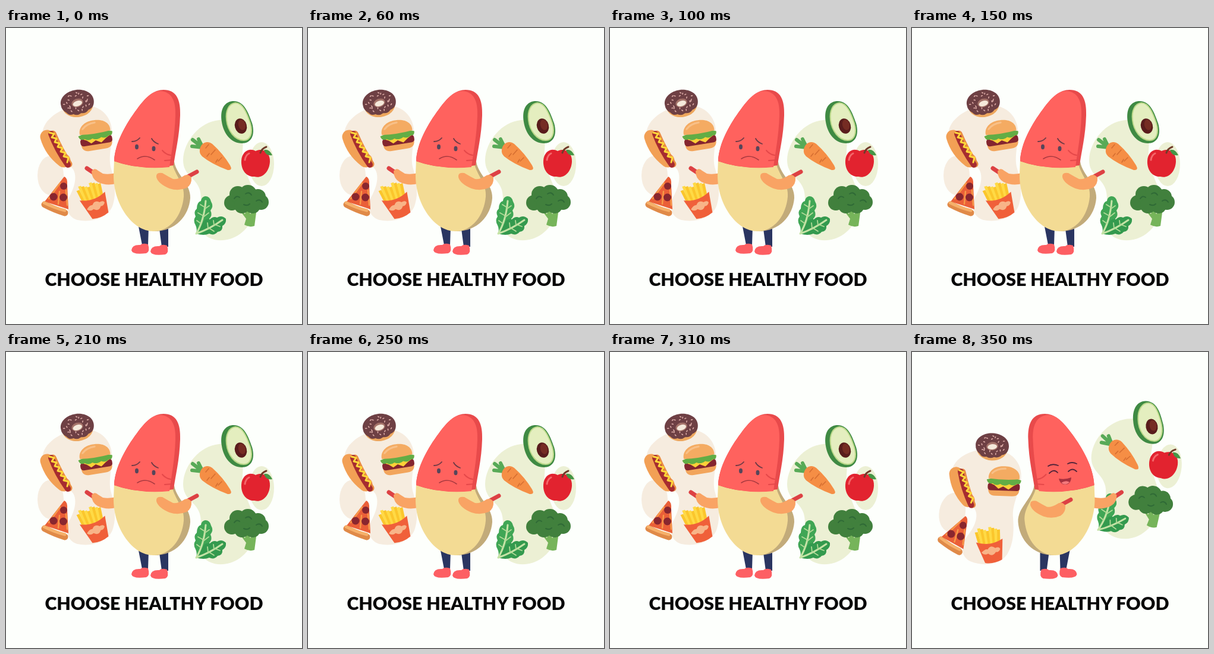
These frames come from a looping animation (498x498 px, 400 ms). An HTML page:

```html
<!DOCTYPE html>
<html lang="en">
<head>
<meta charset="utf-8">
<title>Choose healthy food</title>
<style>
  html, body { margin: 0; width: 100%; height: 100%; overflow: hidden; background: #fdfffc; }
  svg { display: block; width: 100%; height: 100%; }
  text { font: 900 30.3px Lato, sans-serif; text-anchor: middle; fill: #080808; }
  .line { fill: none; stroke-linecap: round; stroke-linejoin: round; }
</style>
</head>
<body>
<svg viewBox="0 0 498 498">
  <g id="junk">
    <g fill="#f6ecdf">
      <path d="M61 182C60 156 86 139 112 132C150 122 181 144 178 180C177 206 172 218 177 237C182 256 187 278 179 300C170 320 143 328 120 323C101 317 99 297 109 279C119 260 120 238 106 232C82 226 62 210 61 182Z"/>
      <ellipse cx="75" cy="248" rx="22" ry="33"/>
    </g>

    <g transform="translate(120 126) rotate(-8)">
      <ellipse cy="4" rx="26" ry="20" fill="#eda75e"/>
      <path d="M-28 -1C-28 -14-14-22 0-22S28-14 28-1C28 7 24 13 17 14Q12 20 4 18Q-3 22-9 18Q-16 20-20 14Q-28 9-28-1Z" fill="#6e4044"/>
      <ellipse rx="10" ry="7" transform="rotate(-10)" fill="#a5736a"/>
      <ellipse cy="1" rx="8" ry="4.5" transform="rotate(-10)" fill="#f5e9db"/>
      <g id="sprinkles" class="line" stroke="#e5b4ae" stroke-width="1.5"/>
    </g>

    <g transform="translate(150.5 180) rotate(-9)">
      <path d="M-26 9H26Q28 25 14 25H-14Q-28 25-26 9Z" fill="#f2a55c"/>
      <rect x="-27" y="3" width="54" height="13" rx="5" fill="#84252f"/>
      <path d="M-25 3H25L16 8L8 14L-1 9L-9 13L-16 7Z" fill="#fcd038"/>
      <path d="M-29 -2Q-15-7 0-5Q18-7 29-2Q28 6 22 4Q16 9 9 5Q1 10-6 5Q-13 9-19 4Q-27 7-29-2Z" fill="#62ad45"/>
      <path d="M-26-4C-27-19-12-26 1-25C16-25 28-17 26-4Q0-1-26-4Z" fill="#f4ab62"/>
      <path class="line" d="M-20-13Q-12-21 2-21" stroke="#f8c088" stroke-width="3"/>
    </g>

    <g class="line">
      <path d="M69 183Q76 207 97 223" stroke="#f2a055" stroke-width="23"/>
      <path d="M79 178Q90 204 106 229" stroke="#e98b42" stroke-width="11"/>
      <path d="M76 178Q86 205 104 230" stroke="#a62c30" stroke-width="10"/>
      <path d="M73 176l8 2-4 6 8 2-3 6 8 2-3 6 8 2-3 6 8 2-3 6 8 2-2 8" stroke="#ffd83a" stroke-width="3"/>
    </g>

    <path d="M98 250Q104 252 103 265L105 305L65 292Z" fill="#ea5f38"/>
    <path class="line" d="M65 297Q82 306 99 311" stroke="#e08a48" stroke-width="11"/>
    <path class="line" d="M64 294Q82 303 99 307" stroke="#f6b06a" stroke-width="5"/>
    <path class="line" d="M91 261L72 287M101 273L103 298M88 296L90 275" stroke="#f79a48" stroke-width="2.5"/>
    <g fill="#89262f">
      <circle cx="97" cy="266" r="6"/><circle cx="80" cy="284" r="6.5"/><circle cx="96.5" cy="285" r="6.5"/>
    </g>

    <g transform="translate(147 287) rotate(-18)">
      <g id="fries"/>
      <path d="M-23-4Q0 6 22-5L17 30Q2 36-12 32Z" fill="#f0603a"/>
      <path d="M-16 14Q-9 8-5 10Q1 2 8 9Q15 7 16 12Q13 17 8 16Q2 24-5 17Q-12 20-16 14Z" fill="#f8b488"/>
    </g>
  </g>

  <g id="greens">
    <g fill="#ecf0d4">
      <path d="M298 222C299 190 326 158 358 155C388 152 402 178 398 206C396 230 404 242 412 263C426 295 418 330 393 347C370 363 340 360 328 340C318 322 333 297 326 272C319 250 298 249 298 222Z"/>
      <ellipse cx="430" cy="229" rx="21" ry="37"/>
    </g>

    <path d="M381 123C400 122 407 140 414 160C420 181 412 194 397 194C379 194 366 178 363 158C360 140 365 125 381 123Z" fill="#3f8a43"/>
    <path d="M386 126C398 126 405 142 411 160C416 177 411 189 400 189C385 189 373 173 371 155C369 139 375 127 386 126Z" fill="#e4eebf" stroke="#bcd98a" stroke-width="2"/>
    <ellipse cx="395" cy="165" rx="10" ry="13" transform="rotate(-15 395 165)" fill="#591c1c"/>
    <ellipse cx="397" cy="163" rx="6" ry="9" transform="rotate(-15 397 163)" fill="#752c23"/>

    <path class="line" d="M331 201L313 199M331 201L314 188M331 201L324 187" stroke="#58aa57" stroke-width="6"/>
    <path d="M326 205C327 194 338 188 347 195Q365 211 377 231Q382 240 373 239Q346 229 330 216Q325 211 326 205Z" fill="#f58e45"/>
    <path class="line" d="M341 196L336 202M352 205L345 213M338 216L342 211M363 218L357 224M353 226L356 221" stroke="#d66e31" stroke-width="1.6"/>

    <path d="M420 207C432 201 445 209 444 225C443 243 430 254 418 250C404 251 395 238 396 223C397 208 409 201 420 207Z" fill="#e2232f"/>
    <path class="line" d="M402 222Q403 214 409 211" stroke="#f4676a" stroke-width="3"/>
    <path class="line" d="M428 210Q430 203 438 200" stroke="#713b29" stroke-width="3"/>
    <path d="M434 205Q443 203 448 214Q437 216 434 205Z" fill="#469646"/>

    <path d="M389 301L402 313L405 302L411 313L422 303L418 333Q410 336 401 331L404 321Z" fill="#76b45a"/>
    <g fill="#41803d">
      <circle cx="380" cy="294" r="13"/><circle cx="390" cy="280" r="14"/><circle cx="407" cy="279" r="15"/>
      <circle cx="424" cy="284" r="13"/><circle cx="429" cy="293" r="13"/><circle cx="415" cy="299" r="13"/><circle cx="397" cy="299" r="13"/>
    </g>
    <path class="line" d="M384 287Q388 281 393 285M403 279Q409 275 413 281M421 291Q427 287 431 293M400 297Q406 300 410 296" stroke="#2f6a36" stroke-width="2"/>

    <path d="M335 283Q343 283 345 292Q350 300 344 307Q348 315 342 321Q342 331 332 336L320 347Q322 338 319 332Q314 324 319 317Q315 309 321 304Q321 293 328 291Q329 284 335 283Z" fill="#40a655"/>
    <path d="M320 346Q327 337 331 328Q335 320 343 322Q349 316 355 319Q363 314 370 321Q371 329 364 333Q365 342 356 343Q350 350 342 346Q333 350 320 346Z" fill="#349a4e"/>
    <path class="line" d="M320 346Q333 325 336 291M320 346Q343 338 364 323" stroke="#c5e3a6" stroke-width="3"/>
    <path class="line" d="M335 302L327 297M335 304L342 299M332 316L323 311M332 318L341 311M328 329L321 324M340 337L339 328M350 332L349 324M342 337L350 342M352 331L360 334" stroke="#b3da98" stroke-width="1.8"/>
  </g>

  <g id="body">
    <path d="M223 334H240L239 365H229ZM258 338H273V368H262Z" fill="#2a3561"/>
    <path d="M211 374Q212 364 226 365Q230 361 239 364Q243 376 236 379Q213 382 211 374ZM243 376Q244 366 258 367Q262 363 271 366Q275 378 268 381Q245 384 243 376Z" fill="#fd5f63"/>
    <path class="line" d="M136 236L148 244" stroke="#dd4144" stroke-width="7"/>
    <path d="M144 241Q149 234 155 240L163 245Q172 247 185 244V262Q168 266 154 259Q144 253 144 241Z" fill="#f9a364"/>
    <path d="M240 225H283C287 248 311 262 310 286C308 316 285 342 250 342Z" fill="#c2ab7a"/>
    <path d="M182 221L279 226C285 250 301 262 299 284C296 316 276 342 248 342C213 342 181 297 181 248Z" fill="#f3db94"/>
    <path d="M182 224C183 194 202 161 220 137C236 115 249 104 265 104C287 104 294 121 293 147C292 182 285 208 282 231Q225 240 182 224Z" fill="#e84a4b"/>
    <path d="M182 224C183 194 202 161 220 137C236 115 247 106 259 106C279 107 286 123 285 147C284 182 278 209 275 234Q225 239 182 224Z" fill="#ff625e"/>
    <path class="line" d="M263 206Q269 213 277 214M267 223L281 222" stroke="#e5484a" stroke-width="2"/>
  </g>

  <g id="arm">
    <path class="line" d="M306 250L321 242" stroke="#dd4144" stroke-width="7"/>
    <path d="M253 251Q252 242 263 244Q273 250 281 254Q289 255 297 250Q306 243 312 252Q313 263 304 269Q290 275 275 270Q256 262 253 251Z" fill="#f9a364"/>
  </g>

  <g id="sad">
    <path class="line" d="M212 191Q220 191 225 185M245 186Q248 192 256 195" stroke="#6b3a46" stroke-width="1.8"/>
    <path class="line" d="M221 220Q235 211 250 222" stroke="#a83a40" stroke-width="1.6"/>
    <g fill="#57465a">
      <ellipse cx="220" cy="200" rx="3" ry="4.2"/><ellipse cx="248.5" cy="203" rx="3" ry="4.2"/>
    </g>
  </g>
  <g id="happy" class="line" stroke="#52253a" stroke-width="1.8">
    <path d="M229 192Q236 187 246 191M262 188Q269 184 277 188M231 204Q239 196 245 203M263 201Q270 194 277 201"/>
    <path d="M247 213Q258 215 268 211Q267 223 258 223Q249 223 247 213Z" fill="#a6303f" stroke="none"/>
    <path d="M251 220Q259 215 265 219Q258 226 251 220Z" fill="#f5797c" stroke="none"/>
  </g>

  <text x="249" y="433.7">CHOOSE HEALTHY FOOD</text>
</svg>
<script>
const el = id => document.getElementById(id);

let specks = '';
for (let i = 0; i < 24; i++) {
  const a = i * 2.4, r = 0.6 + 0.13 * (i % 3);
  const x = 25 * r * Math.cos(a), y = 18 * r * Math.sin(a) - 1;
  specks += `M${x} ${y}l${2 * Math.cos(i * 5)} ${2 * Math.sin(i * 5)}`;
}
el('sprinkles').innerHTML = `<path d="${specks}"/>`;

for (let i = 0; i < 9; i++) {
  const x = -23 + i * 4.7;
  el('fries').innerHTML += `<path d="M${x} ${-21 - 6 * (i * 3 % 4) / 3}h5L${x * 0.8 + 5} 8h-5z" fill="${i % 2 ? '#ffda45' : '#fbc62c'}"/>`;
}

const LOOP = 400, CHEER_AT = 350;
const cheerPose = {
  junk: 'translate(135 158.5) rotate(10.9) translate(-120 -126)',
  greens: 'translate(398 118.5) rotate(5) translate(-389 -158.5)',
  body: 'translate(488.5 0) scale(-1 1)',
  arm: 'translate(-54 6.5)'
};

function draw(now) {
  const cheer = now % LOOP >= CHEER_AT;
  for (const id in cheerPose) el(id).setAttribute('transform', cheer ? cheerPose[id] : '');
  el('sad').style.display = cheer ? 'none' : '';
  el('happy').style.display = cheer ? '' : 'none';
}

const start = performance.now();
function tick() {
  draw(performance.now() - start);
  requestAnimationFrame(tick);
}
tick();
</script>
</body>
</html>
```
